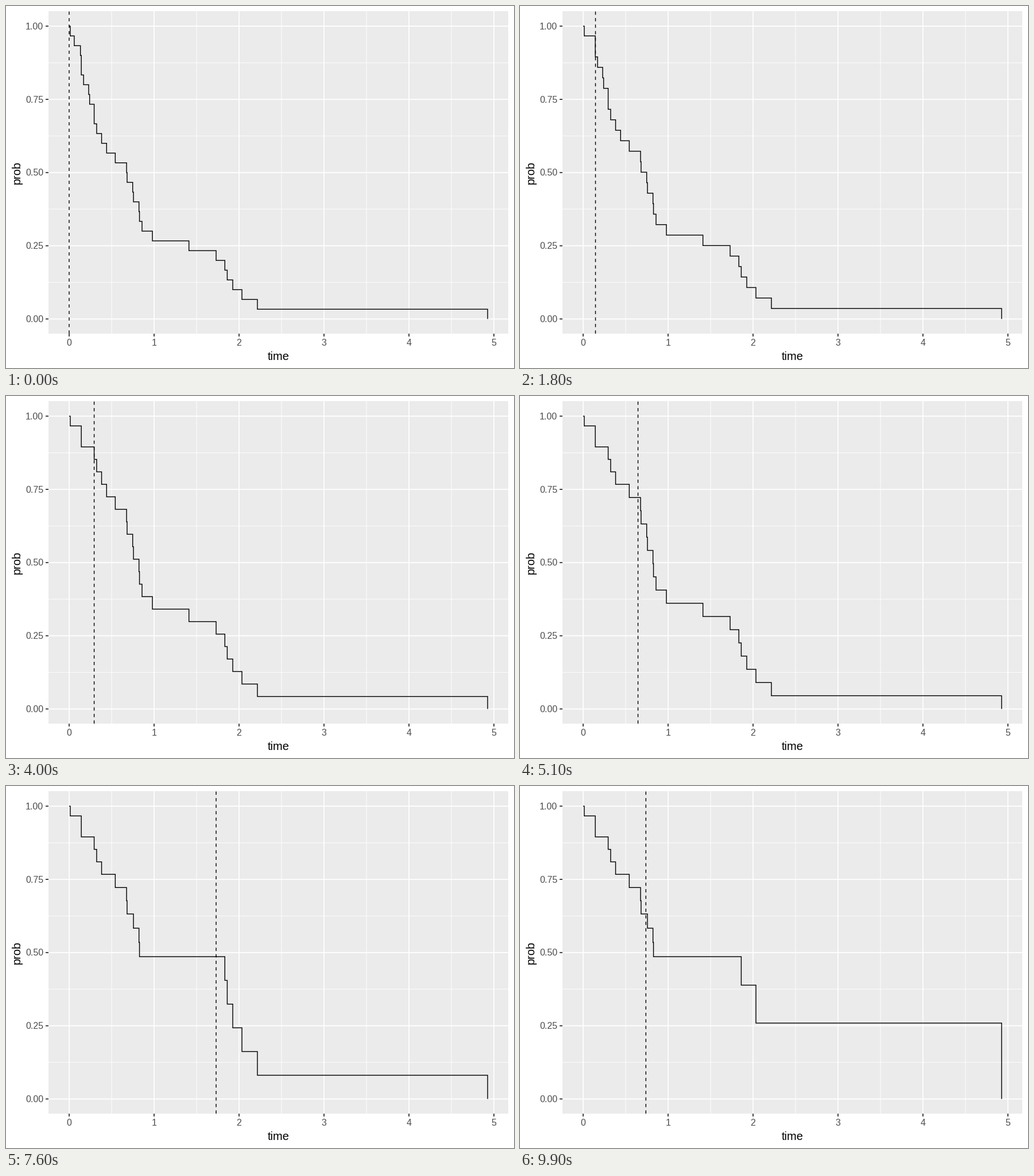
Write a matplotlib script that moves like this. It is 885x632 px and loops after 10000 ms.

```python
import numpy as np
import matplotlib.pyplot as plt
from matplotlib.animation import FuncAnimation
from matplotlib.patches import Rectangle

W, H, DPI = 885, 632, 64
LEFT, RIGHT, TOP, BOTTOM = 74, 875, 9, 572
CURVE_W, MAJOR_W, MINOR_W = 1.42, 1.8, .9
TICK, LABEL_PX, TITLE_PX = 5, 16, 20
FRAMES, STEP_MS, MOVE = 100, 100, 3

# Ordered follow-up times and the indices of the censored subjects.
TIMES = np.array([
    .013, .06, .133, .143, .143, .17, .23, .241, .2945, .2945,
    .324, .382, .441, .543, .676, .682, .748, .757, .822, .828,
    .858, .98, 1.41, 1.73, 1.833, 1.861, 1.926, 2.034, 2.216, 4.926])
CENSORED = [1, 2, 5, 6, 7, 8, 12, 16, 20, 21, 22, 23, 24, 26, 28]

# Frame at which each state is reached; the last entry closes the loop.
ARRIVE = [0] + list(range(6, 35, 7)) + list(range(40, 95, 6)) + [FRAMES]
STOPS = [0.0] + [TIMES[i] for i in CENSORED] + [0.0]


def pt(px):
    return px * 72 / DPI


def sx(t):
    return 110 + 148 * np.asarray(t)


def sy(p):
    return 546.4 - 511.2 * np.asarray(p)


def survival(state):
    """Redistribute the mass of the first censored subjects to the right."""
    mass = np.full(len(TIMES), 1 / len(TIMES))
    for i in CENSORED[:state]:
        mass[i + 1:] += mass[i] / (len(TIMES) - i - 1)
        mass[i] = 0
    keep = mass > 0
    t = np.concatenate([[0], TIMES[keep]])
    p = np.concatenate([[1], 1 - np.cumsum(mass[keep])])
    return sx(t), sy(p)


CURVES = [survival(s) for s in range(len(CENSORED) + 1)]

fig = plt.figure(figsize=(W / DPI, H / DPI), dpi=DPI, facecolor="white")
ax = fig.add_axes([0, 0, 1, 1])
ax.set_xlim(0, W)
ax.set_ylim(H, 0)
ax.axis("off")
ax.add_patch(Rectangle((LEFT, TOP), RIGHT - LEFT, BOTTOM - TOP,
                       fc="#EBEBEB", ec="none", zorder=0))


def stroke(xs, ys, color, width, z=1, **kw):
    line, = ax.plot(xs, ys, color=color, lw=pt(width), zorder=z, snap=False,
                    solid_capstyle="butt", dash_capstyle="butt",
                    solid_joinstyle="miter", **kw)
    return line


def label(x, y, text, px, color, **kw):
    ax.text(x, y, text, fontsize=pt(px), color=color, va="baseline",
            family=["Liberation Sans"], rotation_mode="anchor", **kw)


def vgrid(t, width):
    stroke([sx(t)] * 2, [BOTTOM, TOP], "white", width)


def hgrid(p, width):
    stroke([LEFT, RIGHT], [sy(p)] * 2, "white", width)


for k in range(5):
    vgrid(k + .5, MINOR_W)
for k in range(4):
    hgrid(k / 4 + .125, MINOR_W)

for k in range(6):
    x = sx(k)
    vgrid(k, MAJOR_W)
    stroke([x, x], [BOTTOM, BOTTOM + TICK], "#333333", MAJOR_W)
    label(x, 593, str(k), LABEL_PX, "#4D4D4D", ha="center")
for k in range(5):
    y = sy(k / 4)
    hgrid(k / 4, MAJOR_W)
    stroke([LEFT - TICK, LEFT], [y, y], "#333333", MAJOR_W)
    label(65.2, y + 5.7, f"{k / 4:.2f}", LABEL_PX, "#4D4D4D", ha="right")

label(474.3, 618, "time", TITLE_PX, "black", ha="center")
label(24.6, 290.8, "prob", TITLE_PX, "black", ha="center", rotation=90)

curve = stroke([], [], "black", CURVE_W, 3, drawstyle="steps-post")
marker = stroke([], [], "black", CURVE_W, 4, ls=(0, (4, 4)))


def update(f):
    state = int(np.searchsorted(ARRIVE, f, side="right")) - 1
    part = max(0, MOVE - (ARRIVE[state + 1] - f)) / MOVE
    t = STOPS[state] + (STOPS[state + 1] - STOPS[state]) * part
    curve.set_data(*CURVES[state])
    marker.set_data([sx(t)] * 2, [BOTTOM, TOP])
    return curve, marker


anim = FuncAnimation(fig, update, frames=FRAMES, interval=STEP_MS,
                     init_func=lambda: update(0), repeat=True,
                     repeat_delay=0, blit=False)
plt.show()
```
